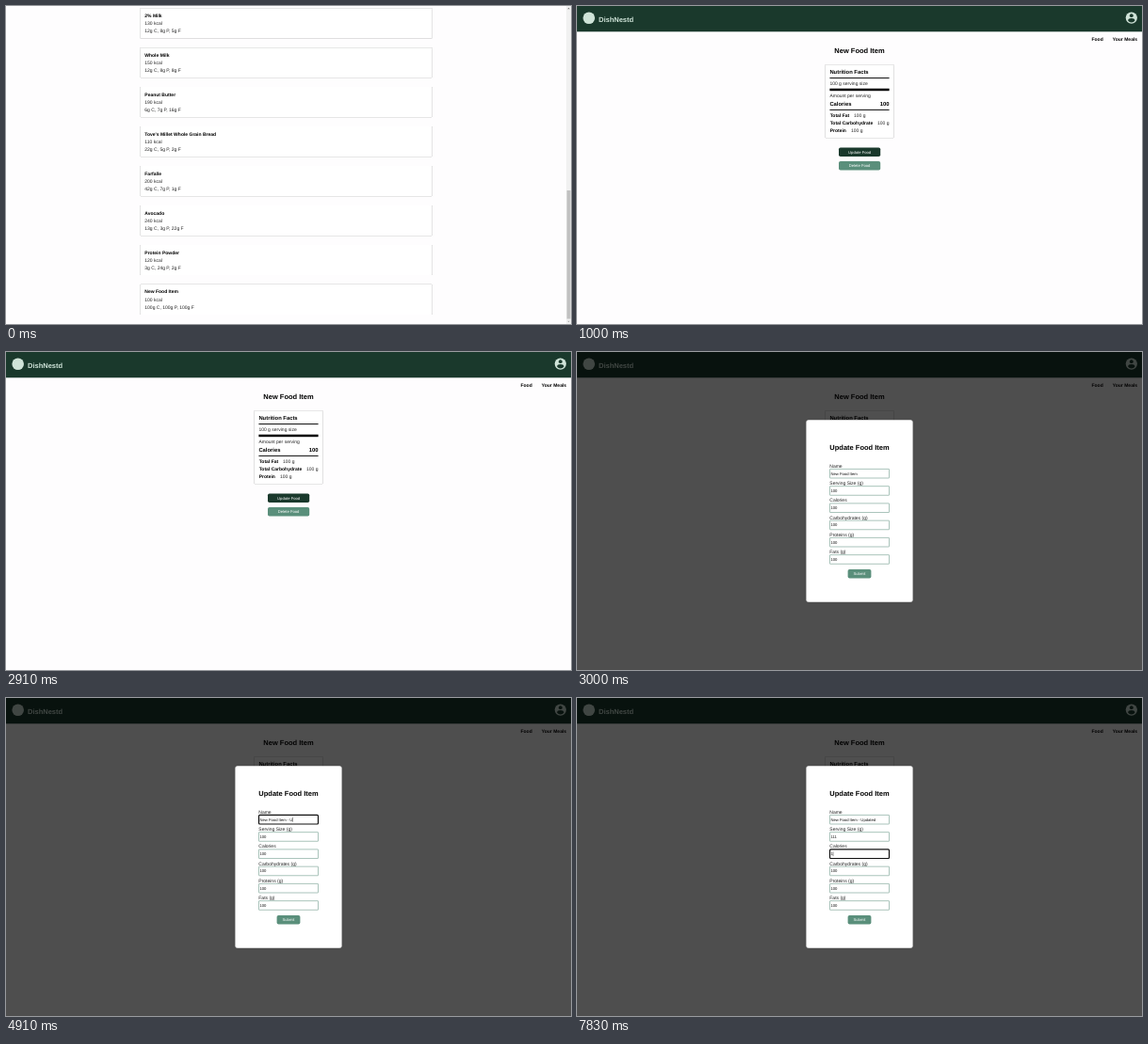
Write an HTML page that moves like this. It is 600 px wide and 338 px high and loops after 8000 ms.

```html
<!DOCTYPE html>
<html lang="en">
<head>
<meta charset="utf-8">
<title>Food tracker</title>
<style>
  html, body { margin: 0; width: 100%; height: 100%; overflow: hidden; background: #fefdfe; }
  svg { display: block; font-family: "Liberation Sans", Arial, sans-serif; text-rendering: geometricPrecision; }
  .card { fill: #fff; filter: drop-shadow(0 .6px .7px rgba(0, 0, 0, .5)); }
</style>
</head>
<body>
<svg id="stage" width="600" height="338" viewBox="0 0 600 338"></svg>
<script>
const LOOP = 8000, PAGE_AT = 1000, MODAL_AT = 3000;
const DARK = '#1a392c', GREEN = '#5a8f7b', PALE = '#cfe3d8';
const SMALL = 4.167, BODY = 5, SUB = 5.85, HEAD = 7.5;

const foods = [
  ['2% Milk', 130, 12, 8, 5],
  ['Whole Milk', 150, 12, 8, 8],
  ['Peanut Butter', 190, 6, 7, 16],
  ["Tove's Millet Whole Grain Bread", 110, 22, 5, 2],
  ['Farfalle', 200, 42, 7, 1],
  ['Avocado', 240, 13, 3, 22],
  ['Protein Powder', 120, 3, 24, 2],
  ['New Food Item', 100, 100, 100, 100],
];
const labels = ['Name', 'Serving Size (g)', 'Calories', 'Carbohydrates (g)', 'Proteins (g)', 'Fats (g)'];

// Form input: [time, field, value, selected]
const name = 'New Food Item', suffix = ' - Updated';
const typedAt = [4410, 4580, 4750, 4910, 5160, 5250, 5330, 5410, 5500, 5750];
const edits = [
  [3750, 0, name],
  [3830, 0, name],
  ...typedAt.map((at, i) => [at, 0, name + suffix.slice(0, i + 1)]),
  [6830, 1, '100', true],
  [7080, 1, '1'],
  [7250, 1, '11'],
  [7410, 1, '111'],
  [7580, 2, '100', true],
  [7830, 2, '1'],
];

const pen = document.createElement('canvas').getContext('2d');
pen.font = '100px "Liberation Sans", Arial, sans-serif';
const widthOf = (s, size) => pen.measureText(s).width * size / 100;

const rect = (x, y, w, h, fill, extra = '') =>
  `<rect x="${x}" y="${y}" width="${w}" height="${h}" fill="${fill}" ${extra}/>`;
const text = (x, y, s, size = BODY, fill = '#222', extra = '') =>
  `<text x="${x}" y="${y}" font-size="${size}" fill="${fill}" ${extra}>${s}</text>`;
const bold = (x, y, s, size = BODY, fill = '#000', anchor = 'start') =>
  text(x, y, s, size, fill, `font-weight="700" text-anchor="${anchor}"`);
const card = (x, y, w, h) => rect(x, y, w, h, '#fff', 'class="card" rx="1"');
const button = (x, y, w, label, fill) =>
  rect(x, y, w, 9.6, fill, 'rx="1.8"') + text(x + w / 2, y + 6.3, label, SMALL, '#fff', 'text-anchor="middle"');
const mix = (a, b, k) => `rgb(${a.map((v, i) => Math.round(v + (b[i] - v) * k))})`;

function scrollbar() {
  return rect(595, 0, 5, 338, '#f1f1f1') + rect(595.6, 196, 3.9, 136.5, '#c1c1c1') +
    '<path d="M596.2 3.2h2.6l-1.3-1.5z" fill="#777"/><path d="M596.2 334.8h2.6l-1.3 1.5z" fill="#aaa"/>';
}

function foodCard([title, kcal, c, p, f], i, hover) {
  const y = 2.2 + i * 41.95 - 1.7 * hover;
  const ink = mix([34, 34, 34], [125, 132, 129], hover);
  return card(142.3, y, 310.4, 32.2) +
    bold(147.3, y + 9.6, title, BODY, mix([0, 0, 0], [90, 143, 123], hover)) +
    text(147.3, y + 17.8, kcal + ' kcal', BODY, ink) +
    text(147.3, y + 25.9, `${c}g C, ${p}g P, ${f}g F`, BODY, ink);
}

function listPage(t) {
  const k = Math.min(1, Math.max(0, (t - 500) / 300));
  const hover = k * k * (3 - 2 * k);
  let s = foods.map((food, i) => foodCard(food, i, i === 7 ? hover : 0)).join('') + scrollbar();
  if (t >= 580) {
    s += '<path d="M0 331.3h72.8q1.4 0 1.4 1.4V338H0z" fill="#3c3c3c"/>' +
      text(1.6, 336.2, 'https://dishnestd.onrender.com/foods/19', 3.9, '#d0d0d0');
  }
  return s;
}

function detailPage() {
  const facts = [['Total Fat', 294], ['Total Carbohydrate', 319], ['Protein', 291]];
  return rect(0, 0, 600, 27.3, DARK) +
    `<circle cx="12.7" cy="12.7" r="6.3" fill="${PALE}"/>` +
    bold(23, 16.5, 'DishNestd', HEAD, PALE) +
    `<circle cx="588.8" cy="12.6" r="6.1" fill="${PALE}"/>` +
    `<circle cx="588.8" cy="10.2" r="1.9" fill="${DARK}"/>` +
    `<path d="M585.1 15.4c.2-3.2 7.2-3.2 7.4 0a4.4 4.4 0 0 1-7.4 0z" fill="${DARK}"/>` +
    bold(546.5, 37, 'Food') + bold(568.8, 37, 'Your Meals') +
    bold(300, 50, 'New Food Item', HEAD, '#000', 'middle') +
    card(263.4, 62.2, 73.2, 78) +
    bold(268.4, 72.4, 'Nutrition Facts', SUB) +
    rect(268.4, 76.1, 63.2, .95, '#000') +
    text(268.4, 84, '100 g serving size') +
    rect(268.4, 87.7, 63.2, 2.5, '#000') +
    text(268.4, 97.2, 'Amount per serving') +
    bold(268.4, 106, 'Calories', SUB) + bold(331.6, 106, '100', SUB, '#000', 'end') +
    rect(268.4, 109.9, 63.2, .95, '#000') +
    facts.map(([label, x], i) => bold(268.7, 117.8 + 8.1 * i, label) + text(x, 117.8 + 8.1 * i, '100 g')).join('') +
    button(278, 150.4, 44.2, 'Update Food', DARK) +
    button(278, 165, 44.2, 'Delete Food', GREEN);
}

function field(i, value, focus, selected, caretOn) {
  const y = 124.4 + 18.25 * i, x = 269.5, w = widthOf(value, SMALL);
  const border = focus ? 'stroke="#101010" stroke-width="1.2" rx="1"' : 'stroke="#86ab9e" stroke-width=".7" rx=".3"';
  let s = text(268.3, y - 1.5, labels[i]) + rect(268.5, y, 63, 9.6, '#fff', border);
  if (selected) s += rect(x, y + 2.4, w, 4.8, '#0078d7');
  s += text(x, y + 6.3, value, SMALL, selected ? '#fff' : '#111');
  if (focus && caretOn && !selected) s += rect(x + w, y + 2.5, .4, 4.8, '#000');
  return s;
}

function modal(t) {
  const values = [name, '100', '100', '100', '100', '100'];
  let last = [0, -1];
  for (const edit of edits) {
    if (edit[0] > t) break;
    last = edit;
    values[edit[1]] = edit[2];
  }
  const [at, active, , selected] = last;
  const caretOn = Math.floor((t - at) / 500) % 2 === 0;
  return rect(0, 0, 600, 338, '#000', 'opacity=".69"') +
    rect(243.4, 72.2, 113.2, 193.6, '#fff', 'rx="2.5"') +
    bold(300, 104.2, 'Update Food Item', HEAD, '#000', 'middle') +
    values.map((v, i) => field(i, v, i === active, i === active && selected, caretOn)).join('') +
    button(287.6, 230.9, 24.8, 'Submit', GREEN);
}

const stage = document.getElementById('stage');
let shown = '';
function frame() {
  const t = performance.now() % LOOP;
  const scene = rect(0, 0, 600, 338, '#fefdfe') +
    (t < PAGE_AT ? listPage(t) : detailPage() + (t < MODAL_AT ? '' : modal(t)));
  if (scene !== shown) stage.innerHTML = shown = scene;
  requestAnimationFrame(frame);
}
frame();
</script>
</body>
</html>
```
